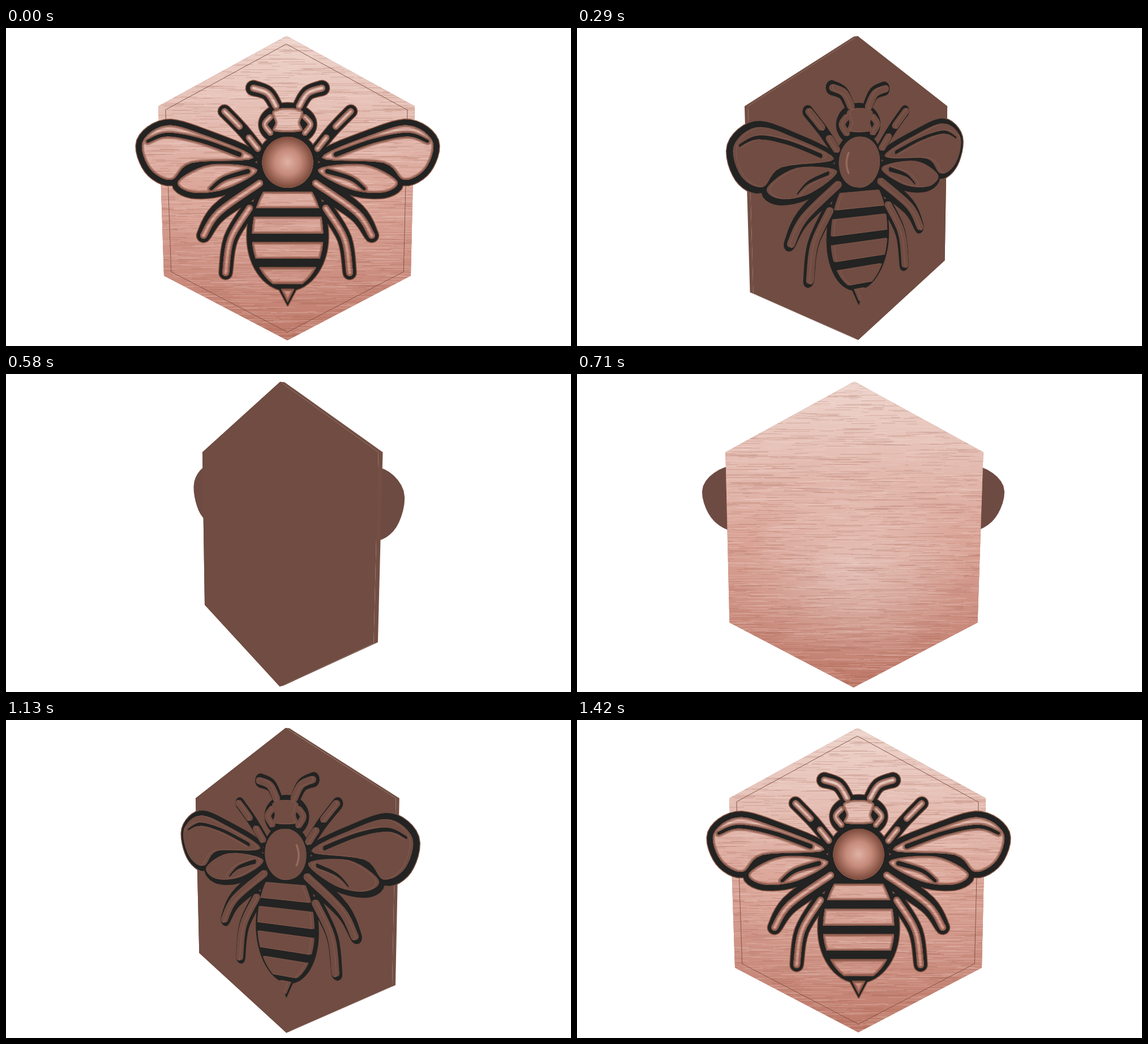
Recreate the animation shown at these times as an HTML page. Size 998 by 561 pixels, loop 1460 ms.

```html
<!DOCTYPE html>
<html lang="en">
<head>
<meta charset="utf-8">
<title>Copper bee</title>
<style>
html, body { margin: 0; width: 100%; height: 100%; overflow: hidden; background: #fff; }
svg { display: block; width: 100vw; height: 100vh; }
</style>
</head>
<body>
<svg viewBox="0 0 998 561">
  <defs>
    <linearGradient id="face" gradientUnits="userSpaceOnUse" x1="0" y1="14" x2="0" y2="552"></linearGradient>
    <linearGradient id="shade" gradientUnits="userSpaceOnUse">
      <stop offset="0" stop-color="#704c42" stop-opacity="0"/>
      <stop offset="1" stop-color="#704c42"/>
    </linearGradient>
    <radialGradient id="glow">
      <stop offset="0" stop-color="#fff" stop-opacity=".36"/>
      <stop offset="1" stop-color="#fff" stop-opacity="0"/>
    </radialGradient>
    <radialGradient id="ball"></radialGradient>
    <clipPath id="hexClip"><path id="hexShape"/></clipPath>
    <clipPath id="topClip"><path id="topShape"/></clipPath>
    <g id="metal">
      <rect width="998" height="561" fill="url(#face)"/>
      <rect id="shadeRect" width="998" height="561" fill="url(#shade)"/>
      <ellipse id="glowSpot" cx="492" cy="350" rx="200" ry="170" fill="url(#glow)"/>
      <g id="brush" fill="none" stroke-width=".7">
        <path id="darkBrush" stroke="#9d5b4a"/>
        <path id="lightBrush" stroke="#f8e6e0"/>
      </g>
    </g>
  </defs>
  <path id="rear" fill="#6e4b42"/>
  <path id="slab"/>
  <use href="#metal" clip-path="url(#hexClip)"/>
  <g id="front" stroke-linejoin="round" stroke-linecap="round">
    <path id="border" fill="none" stroke="#7c4c3f"/>
    <path id="floor" fill="#222322" stroke-width="3" paint-order="stroke"/>
    <path id="wall"/>
    <use href="#metal" clip-path="url(#topClip)"/>
    <g clip-path="url(#topClip)" fill="none">
      <path id="bevelWide" stroke="#7d4a3b" stroke-width="8"/>
      <path id="bevel" stroke="#7d4a3b" stroke-width="4"/>
      <path id="shine" stroke="#cf9683" stroke-width="1.5"/>
    </g>
    <path id="dome" fill="url(#ball)"/>
    <path id="domeShine" fill="none" stroke="#cf9683" stroke-width="3.5"/>
  </g>
</svg>
<script>
const $ = id => document.getElementById(id);
const set = (id, attrs) => { for (const k in attrs) $(id).setAttribute(k, attrs[k]); };
const clamp = v => Math.max(0, Math.min(1, v));

// Camera: the horizon lies at HY, the turning axis at AX
const AX = 492.75, HY = 138, DIST = 1430, TILT = 1.26e-4;
const Z = { back: -9, face: 1.5, floor: 2, top: 8, dome: 15 };
let cos = 1, sin = 0;

function project(X, Y, z) {
  const w = 1 - (z * cos - X * sin) / DIST + TILT * Y;
  return [AX + (X * cos + z * sin) / w, HY + Y / w];
}
// Stage position in the facing pose -> model position
function toModel([x, y], z) {
  const dy = y - HY, near = 1 - z / DIST;
  const Y = dy * near / (1 - TILT * dy);
  return [(x - AX) * (near + TILT * Y), Y];
}
const line = (pts, z) => 'M' + pts.map(([X, Y]) =>
  project(X, Y, z).map(v => v.toFixed(1)).join(' ')).join('L');
const outline = (pts, z) => line(pts, z) + 'Z';

// Shape helpers
const MID = 497.5;
const parse = s => s.split(' ').map(p => p.split(',').map(Number));
const mirror = pts => pts.map(([x, y]) => [2 * MID - x, y]);
const sym = pts => pts.concat(mirror(pts).reverse());
const area = pts => pts.reduce((sum, [x, y], i) => {
  const [u, v] = pts[(i + 1) % pts.length];
  return sum + x * v - u * y;
}, 0);
const orient = pts => area(pts) < 0 ? pts.slice().reverse() : pts;

function arc(cx, cy, rx, ry = rx, from = 0, to = 360) {
  const pts = [];
  for (let a = from; a <= to; a += 6) {
    const f = a * Math.PI / 180;
    pts.push([cx + rx * Math.cos(f), cy + ry * Math.sin(f)]);
  }
  return pts;
}
function smooth(pts, closed = true) {
  const n = pts.length, out = [], steps = 6;
  const at = i => closed ? pts[(i + n) % n] : pts[Math.max(0, Math.min(n - 1, i))];
  for (let i = 0; i < (closed ? n : n - 1); i++) {
    const [a, b, c, d] = [at(i - 1), at(i), at(i + 1), at(i + 2)];
    for (let k = 0; k < steps; k++) {
      const t = k / steps;
      out.push([0, 1].map(j => b[j] + .5 * t * (c[j] - a[j] +
        t * (2 * a[j] - 5 * b[j] + 4 * c[j] - d[j] + t * (3 * (b[j] - c[j]) + d[j] - a[j])))));
    }
  }
  if (!closed) out.push(pts[n - 1]);
  return out;
}
// Push a closed outline outwards by r
function grow(shape, r) {
  const pts = orient(shape), n = pts.length;
  return pts.map(([x, y], i) => {
    const a = pts[(i + n - 1) % n], b = pts[(i + 1) % n];
    const dx = b[0] - a[0], dy = b[1] - a[1], len = Math.hypot(dx, dy) || 1;
    return [x + r * dy / len, y - r * dx / len];
  });
}
// Round-ended band along a curve, tapering from r to end
function tube(mid, r, end = r) {
  const n = mid.length - 1, left = [], right = [], cap = [], tail = [];
  const off = (i, turn) => {
    const a = mid[Math.max(0, i - 1)], b = mid[Math.min(n, i + 1)];
    const f = Math.atan2(b[1] - a[1], b[0] - a[0]) + turn;
    const w = r + (end - r) * i / n;
    return [mid[i][0] + w * Math.cos(f), mid[i][1] + w * Math.sin(f)];
  };
  for (let i = 0; i <= n; i++) {
    left.push(off(i, -Math.PI / 2));
    right.unshift(off(i, Math.PI / 2));
  }
  for (let k = -3; k <= 3; k++) {
    cap.push(off(n, k * Math.PI / 8));
    tail.push(off(0, Math.PI + k * Math.PI / 8));
  }
  return [...left, ...cap, ...right, ...tail];
}
const curve = s => smooth(parse(s), false);

const floors = [], cells = [];
const put = (list, z, pts) => list.push(pts.map(p => toModel(p, z)));
const addFloor = pts => put(floors, Z.floor, orient(pts));
const addCell = pts => put(cells, Z.top, orient(pts));
const addSlit = pts => put(cells, Z.top, orient(pts).reverse()); // opposite winding cuts a hole
const pair = (add, pts) => { add(pts); add(mirror(pts)); };

function limb(path, root, tip, core, parts = [[0, 1]]) {
  const mid = curve(path), n = mid.length;
  pair(addFloor, tube(mid, root, tip));
  for (const [a, b] of parts) pair(addCell, tube(mid.slice(a * n, b * n), core));
}
function lobe(shape, slit) {
  const cell = smooth(parse(shape));
  pair(addFloor, grow(cell, 10));
  pair(addCell, cell);
  pair(addSlit, tube(curve(slit), 3, 4.5));
}

// Wings, antennae, legs
lobe('437,229 345,187 282,172 241,201 254,248 292,268 328,238', '250,200 285,188 345,199 412,223');
lobe('444,250 362,241 304,270 328,290 388,284', '362,284 385,266 427,253');
limb('477,138 462,115 437,106', 11, 13, 6);
limb('448,217 418,180 386,147', 10, 11, 5.5, [[.1, .44], [.58, 1]]);
limb('448,274 376,325 349,366', 19, 12, 6);
limb('430,318 397,372 388,432', 13, 11.5, 6);

// Head and thorax
addFloor(arc(MID, 170, 51, 38));
addCell(smooth(sym(parse('484,142 470,149 476,167 474,182'))));
pair(addCell, tube(curve('467,157 457,170 467,185'), 5));
addFloor(arc(MID, 237, 54));
addCell(arc(MID, 237, 45));

// Abdomen: an egg cut into even bands
const eggHalf = y => 72 * Math.sqrt(1 - ((y - 368) / (y < 368 ? 115 : 96)) ** 2);
addFloor([...arc(MID, 368, 72, 96, 0, 180), ...arc(MID, 368, 72, 115, 180, 360)]);
for (let i = 0; i < 4; i++) {
  const side = [];
  for (let k = 0; k <= 4; k++) {
    const y = 289 + 44.6 * i + 7.2 * k;
    side.push([MID - eggHalf(y) + 9, y]);
  }
  addCell(sym(side));
}
const sting = parse('486,461 509,461 497.5,484');
addFloor(grow(sting, 6));
addCell(sting);

const dome = [0, 15, 30, 45, 60, 75].map(a => {
  const f = a * Math.PI / 180;
  const z = Z.floor + (Z.dome - Z.floor) * Math.sin(f);
  return { z, pts: arc(MID, 237, 45 * Math.cos(f)).map(p => toModel(p, Z.top)) };
});
const onFace = pts => pts.map(p => toModel(p, Z.face));
const plate = parse('495.5,14 722,138 715,437 497,551 279,437 269,138');
const hex = onFace(plate), inset = onFace(grow(plate, -14.5));

// Brushed metal: seeded streaks
let seed = 7;
const rnd = () => (seed = seed * 16807 % 2147483647) / 2147483647;
const streaks = n => Array.from({ length: n }, () => {
  const x = 215 + rnd() * 555, y = 14 + rnd() * 538, len = 12 + rnd() * 60;
  return onFace([[x, y], [x + len, y + rnd() - .5]]);
});
const darkStreaks = streaks(1300), lightStreaks = streaks(1300);

// Colours: seen square on, slightly turned, and turned away
const rgb = c => [1, 3, 5].map(i => parseInt(c.substr(i, 2), 16));
const mix = (a, b, t) => a.map((v, i) => v + (b[i] - v) * t);
const css = c => `rgb(${c.map(Math.round)})`;
const DARK = rgb('#704c42');
function ramp(id, lit, mid) {
  const stops = lit.map((c, i) => {
    const el = document.createElementNS('http://www.w3.org/2000/svg', 'stop');
    el.setAttribute('offset', i / (lit.length - 1));
    $(id).appendChild(el);
    return { el, lit: rgb(c), mid: rgb(mid[i]) };
  });
  return (l, m) => stops.forEach(s =>
    s.el.setAttribute('stop-color', css(mix(mix(DARK, s.mid, m), s.lit, l))));
}
const paintFace = ramp('face', ['#eed5cd', '#dba699', '#bd7868'], ['#a26957', '#a36a57', '#996351']);
const paintBall = ramp('ball', ['#e0b1a4', '#c58a7a', '#7c4a3b'], ['#aa705d', '#a26856', '#7a4a3b']);

const flat = (list, z) => list.map(pts => outline(pts, z)).join('');
function layers(list, from, to, n) {
  let d = '';
  for (let k = 0; k <= n; k++) d += flat(list, from + (to - from) * k / n);
  return d;
}
const sides = () => hex.map((p, i) => {
  const q = hex[(i + 1) % 6];
  const c = [project(...p, Z.face), project(...q, Z.face), project(...q, Z.back), project(...p, Z.back)];
  return 'M' + orient(c).map(v => v.join(' ')).join('L') + 'Z';
}).join('');

function draw(turn) {
  const th = turn * 2 * Math.PI;
  cos = Math.cos(th);
  sin = Math.sin(th);
  const facing = cos > 0, side = (sin >= 0) === facing ? 1 : -1;
  const off = Math.asin(Math.min(1, Math.abs(sin))) * 180 / Math.PI;
  const lit = Math.exp(-((off / 6) ** 2));
  const mid = clamp((36 - off) / 20);
  const zFace = facing ? Z.face : Z.back;

  paintFace(lit, mid);
  paintBall(lit, mid);
  const wallColor = css(mix(DARK, rgb('#82503f'), mid));
  set('shade', { x1: 495 - 175 * side, x2: 495 + 205 * side });
  set('shadeRect', { opacity: (1 - lit) * mid * .5 });
  set('glowSpot', { opacity: lit * (facing ? .25 : 1) });
  const grain = lit * .3 + mid * .08;
  set('brush', { opacity: grain });
  if (grain > .01) {
    set('darkBrush', { d: darkStreaks.map(s => line(s, zFace)).join('') });
    set('lightBrush', { d: lightStreaks.map(s => line(s, zFace)).join('') });
  }

  set('hexShape', { d: outline(hex, zFace) });
  set('slab', { d: sides(), fill: css(mix(rgb('#734e43'), rgb('#b17767'), lit)) });
  set('rear', { d: facing ? '' : layers(floors, Z.face, Z.top - 1, 4) });
  set('front', { display: facing ? 'inline' : 'none' });
  if (!facing) return;

  const top = flat(cells, Z.top);
  set('border', { d: outline(inset, Z.face), opacity: mid * (.3 + lit * .6) });
  set('floor', { d: flat(floors, Z.floor), stroke: wallColor });
  set('wall', { d: layers(cells, Z.floor, Z.top, 5), fill: wallColor });
  set('topShape', { d: top });
  set('bevelWide', { d: top, opacity: .45 * mid * (.3 + .7 * lit) });
  set('bevel', { d: top, opacity: .65 * mid * (.4 + .6 * lit) });
  set('shine', {
    d: top, transform: `translate(${side * 2.2} -.6)`,
    opacity: (1 - lit) * (.15 + .35 * mid)
  });
  set('dome', { d: dome.map(r => outline(r.pts, r.z)).join('') });
  const from = side > 0 ? 150 : -30;
  const glint = arc(MID, 237, 35, 35, from, from + 60).map(p => toModel(p, Z.top));
  set('domeShine', { d: line(glint, 11), opacity: (1 - lit) * .4 });
}

// One eased turn in 34 steps at 24 per second
const LOOP = 1460, STEP = 1000 / 24, LAST = 34;
let start = null, shown = -1;
function tick(now) {
  if (start === null) start = now;
  const t = (now - start) % LOOP;
  const step = Math.min(LAST, Math.floor((t + 5) / STEP));
  if (step !== shown) {
    shown = step;
    const u = step / LAST;
    draw(u * u * (3 - 2 * u));
  }
  requestAnimationFrame(tick);
}
draw(0);
requestAnimationFrame(tick);
</script>
</body>
</html>
```
